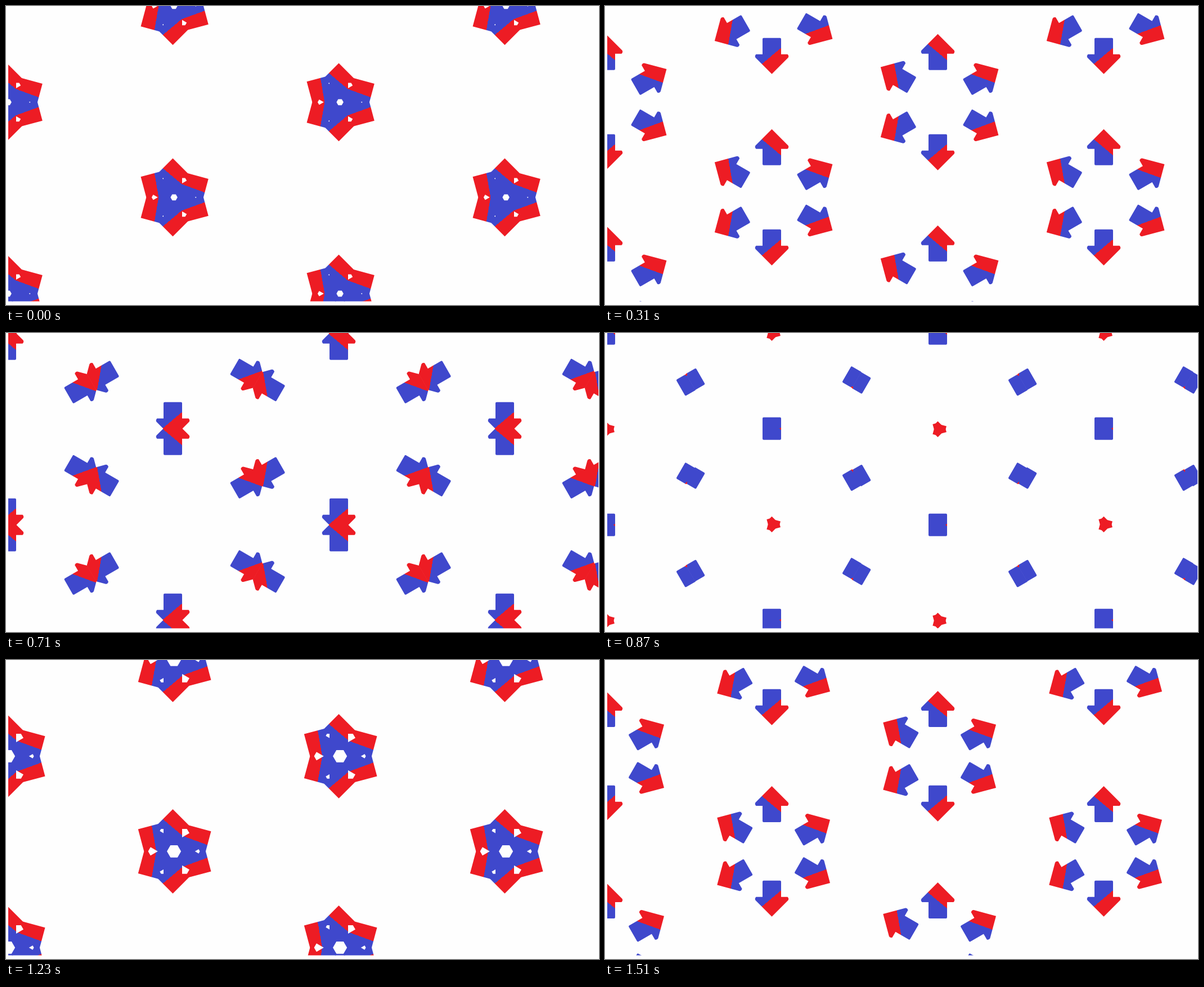
An HTML page with a canvas that plays this animation: 1054x531 px, repeating every 1.55 s.

```html
<!DOCTYPE html>
<html lang="en">
<head>
<meta charset="utf-8">
<title>Arrow kaleidoscope</title>
<style>
  html, body { margin: 0; width: 100%; height: 100%; overflow: hidden; background: #fefefe; }
  canvas { display: block; }
</style>
</head>
<body>
<canvas width="1054" height="531"></canvas>
<script>
const ctx = document.querySelector('canvas').getContext('2d');
const BLUE = '#3f48cc', RED = '#ed1c24', PAPER = '#fefefe';
const LOOP = 1550, STEP = 40, FIRST = 30;
const HALF = 170;      // distance from a star centre to the far mirror
const SPACING = 199.8; // gap between successive arrows on the track
const AXIS = -2.1;     // arrow axis, beside the wedge axis

// Key points of the tip's travel: time, distance from the star centre
const keys = [[0, 69.4], [310, 121], [550, 166], [710, 187], [1350, 294.9], [LOOP, 320.9]];

// Arrow pointing up, tip at the origin
const arrow = new Path2D('M0 0L29 29Q31 32 28 35H-28Q-31 32 -29 29Z');
arrow.roundRect(-16.5, 30, 33, 34, 2);

// Two-tone paint with a hard slanted edge
function makePaint(angle, distance) {
  const span = 2 * distance;
  const paint = ctx.createLinearGradient(0, 0, -Math.sin(angle) * span, Math.cos(angle) * span);
  paint.addColorStop(0.5, RED);
  paint.addColorStop(0.5, BLUE);
  return paint;
}
const paint = makePaint(40 * Math.PI / 180, 25);

// Mirror triangle, slightly enlarged so that neighbours leave no seam
const reach = (HALF + 2) * Math.tan(Math.PI / 6);
const wedge = new Path2D(`M0 1.4L${reach} ${-HALF - 0.7}H${-reach}Z`);

function tipAt(time) {
  const t = time < FIRST ? 0 : FIRST + Math.floor((time - FIRST) / STEP) * STEP;
  const i = keys.findIndex(([end]) => end > t);
  const [t0, d0] = keys[i - 1], [t1, d1] = keys[i];
  return d0 + (d1 - d0) * (t - t0) / (t1 - t0);
}

function drawArrow(tip) {
  ctx.save();
  ctx.translate(AXIS, -tip);
  ctx.fillStyle = paint;
  ctx.fill(arrow);
  ctx.restore();
}

function drawStar(x, y, tip) {
  for (let turn = 0; turn < 3; turn++) {
    for (const flip of [1, -1]) {
      ctx.save();
      ctx.translate(x, y);
      ctx.scale(1, flip);
      ctx.rotate(turn * Math.PI * 2 / 3);
      ctx.clip(wedge);
      drawArrow(tip);
      drawArrow(tip - SPACING);
      ctx.restore();
    }
  }
}

function draw(time) {
  const tip = tipAt(time);
  ctx.fillStyle = PAPER;
  ctx.fillRect(0, 0, 1054, 531);
  ctx.save();
  ctx.beginPath();
  ctx.rect(4, 0, 1049, 524.5);
  ctx.clip();
  for (let col = -2; col <= 2; col++) {
    const top = col % 2 ? -0.2 : 170.8;
    for (let row = -1; row <= 2; row++) {
      drawStar(593.6 + col * 295, top + row * 2 * HALF, tip);
    }
  }
  ctx.restore();
}

const start = performance.now();
function tick() {
  draw((performance.now() - start) % LOOP);
  requestAnimationFrame(tick);
}
tick();
</script>
</body>
</html>
```
